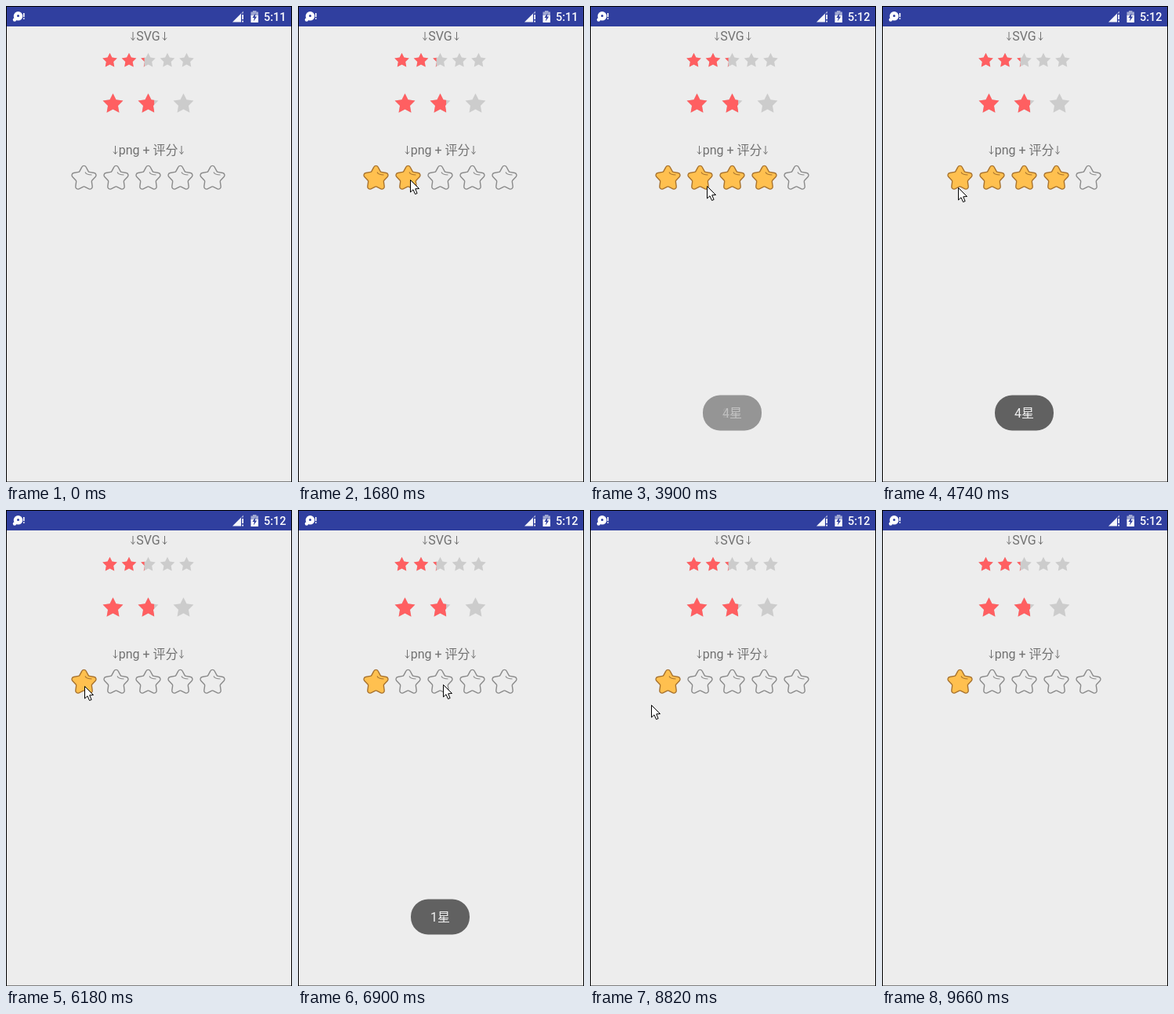
An HTML page with a canvas that plays this animation: 365x606 px, repeating every 9.96 s.

```html
<!DOCTYPE html>
<html lang="zh">
<head>
<meta charset="utf-8">
<title>Star rating</title>
<style>
  html, body { margin: 0; width: 100%; height: 100%; overflow: hidden; background: #ededed; }
  canvas { display: block; width: 365px; height: 606px; }
</style>
</head>
<body>
<canvas id="stage"></canvas>
<script>
const W = 365, H = 606, LOOP = 9960, STEP = 60;
const FONT = 'Roboto, "Noto Sans CJK SC", "Noto Sans CJK", sans-serif';
const RED = '#ff5f61', GREY = '#cccccc', INK = '#727272', BAR = '#303f9f';

const canvas = document.getElementById('stage');
const ctx = canvas.getContext('2d');
const dpr = window.devicePixelRatio || 1;
canvas.width = W * dpr;
canvas.height = H * dpr;

// Pointer path: time, x, y
const path = [
  [180, 289, 105], [540, 212, 172], [840, 139, 220], [1020, 143, 221],
  [1860, 143, 221], [2400, 227, 220],
  [3180, 227, 220], [3720, 175, 226], [4200, 108, 232], [4320, 101, 232],
  [4440, 101, 232], [4740, 97, 231], [4860, 97, 231], [5340, 100, 224],
  [6600, 100, 224], [7140, 271, 221], [7320, 296, 222],
  [7680, 296, 222], [7860, 304, 222], [8220, 236, 254], [8580, 74, 250],
  [8760, 74, 250], [9240, 220, 178], [9600, 355, 43]
];
const toasts = [
  { text: '2星', show: 1700, hide: 3620 },
  { text: '4星', show: 3760, hide: 5600 },
  { text: '1星', show: 6200, hide: 8100 }
];
const FADE_IN = 540, FADE_OUT = 340;

const clamp = v => Math.max(0, Math.min(1, v));

function slope(i, axis) {
  const a = path[i], b = path[i + 1];
  return (b[axis] - a[axis]) / (b[0] - a[0]);
}

// Flat at rests and turning points, so the curve never overshoots
function tangent(i, axis) {
  if (i === 0) return slope(0, axis);
  if (i === path.length - 1) return slope(i - 1, axis);
  const p = slope(i - 1, axis), n = slope(i, axis);
  return p * n <= 0 ? 0 : 2 * p * n / (p + n);
}

function along(t, axis) {
  let i = 0;
  while (i < path.length - 2 && t >= path[i + 1][0]) i++;
  const a = path[i], b = path[i + 1], d = b[0] - a[0];
  const u = clamp((t - a[0]) / d), v = 1 - u;
  return a[axis] * (1 + 2 * u) * v * v + tangent(i, axis) * d * u * v * v
       + b[axis] * u * u * (3 - 2 * u) - tangent(i + 1, axis) * d * u * u * v;
}

function rect(x, y, w, h, color) {
  ctx.fillStyle = color;
  ctx.fillRect(x, y, w, h);
}

function poly(points, color) {
  ctx.beginPath();
  points.forEach(([x, y]) => ctx.lineTo(x, y));
  ctx.closePath();
  ctx.fillStyle = color;
  ctx.fill();
}

function disc(x, y, r, color) {
  ctx.beginPath();
  ctx.arc(x, y, r, 0, Math.PI * 2);
  ctx.fillStyle = color;
  ctx.fill();
}

function label(text, x, y, size, color, weight = 400) {
  ctx.font = `${weight} ${size}px ${FONT}`;
  ctx.fillStyle = color;
  ctx.fillText(text, x, y);
}

function starPoints(cx, cy, outer, inner) {
  return Array.from({ length: 10 }, (_, i) => {
    const r = i % 2 ? inner : outer, a = i * Math.PI / 5 - Math.PI / 2;
    return [cx + r * Math.cos(a), cy + r * Math.sin(a)];
  });
}

function flatStar(cx, cy, r, fill) {
  const points = starPoints(cx, cy, r, r * 0.5);
  poly(points, GREY);
  if (!fill) return;
  ctx.save();
  ctx.beginPath();
  ctx.rect(cx - r, cy - r, 2 * r * fill, 2 * r);
  ctx.clip();
  poly(points, RED);
  ctx.restore();
}

function roundStar(cx, cy, on) {
  const p = starPoints(cx, cy, 19.5, 10.2);
  ctx.beginPath();
  ctx.moveTo((p[9][0] + p[0][0]) / 2, (p[9][1] + p[0][1]) / 2);
  p.forEach((q, i) => {
    const n = p[(i + 1) % 10];
    ctx.arcTo(q[0], q[1], n[0], n[1], i % 2 ? 2 : 3);
  });
  ctx.closePath();
  if (on) {
    ctx.fillStyle = '#ffc04f';
    ctx.fill();
  }
  ctx.strokeStyle = on ? '#a8732f' : '#8a8a8a';
  ctx.lineWidth = 1.4;
  ctx.stroke();
  ctx.beginPath();
  ctx.moveTo(cx + 1.5, cy - 8);
  ctx.quadraticCurveTo(cx + 3, cy - 4.5, cx + 10, cy - 4.5);
  ctx.lineWidth = 1.1;
  ctx.stroke();
}

function arrow(x, base) {
  ctx.beginPath();
  ctx.moveTo(x, base - 10.5);
  ctx.lineTo(x, base);
  ctx.moveTo(x - 2.5, base - 3);
  ctx.lineTo(x, base);
  ctx.lineTo(x + 2.5, base - 3);
  ctx.strokeStyle = INK;
  ctx.lineWidth = 1;
  ctx.stroke();
}

function statusBar(time) {
  rect(0, 1, W, 25, BAR);
  // Notification
  disc(15.5, 12.8, 5.8, '#fff');
  disc(15.5, 12.5, 1.5, BAR);
  disc(11, 17.5, 2.2, '#fff');
  rect(22, 9, 1.6, 5, '#fff');
  rect(22, 15.2, 1.6, 1.6, '#fff');
  // Signal
  poly([[289, 20.5], [300, 20.5], [300, 9.5]], '#f4f5fa');
  poly([[300, 9.5], [303, 6.5], [303, 9.5]], '#aab1d8');
  rect(301.3, 11, 1.7, 6, '#fff');
  rect(301.3, 18.6, 1.7, 1.9, '#fff');
  // Battery
  rect(315, 6, 4.5, 2, '#a0a8d2');
  rect(312.5, 7.5, 9.5, 5, '#a0a8d2');
  rect(312.5, 12, 9.5, 9, '#fff');
  poly([[318.6, 9], [314.4, 15], [316.8, 15], [316, 19.5], [320.2, 13.5], [317.8, 13.5]], BAR);
  label(time, 329, 19, 14.4, '#fff', 500);
}

function toast({ text, show, hide }, t) {
  if (t <= show || t >= hide + FADE_OUT) return;
  const enter = 1 - (1 - clamp((t - show) / FADE_IN)) ** 2;
  const exit = 1 - clamp((t - hide) / FADE_OUT) ** 2;
  ctx.save();
  ctx.globalAlpha = enter * exit;
  ctx.beginPath();
  ctx.roundRect(144, 495.5, 75, 45, 22);
  ctx.fillStyle = '#616161';
  ctx.fill();
  label(text, 169, 524, 16, '#f2f2f2');
  ctx.restore();
}

function pointer(t) {
  if (t < 180 || t >= 9660) return;
  ctx.save();
  ctx.translate(Math.round(along(t, 1)) + 0.5, Math.round(along(t, 2)) + 0.5);
  poly([[0, 0], [0, 15.5], [3.5, 12.3], [6, 18], [8.6, 17], [6.2, 11.3], [11, 11]], '#fff');
  ctx.strokeStyle = '#000';
  ctx.lineWidth = 1;
  ctx.stroke();
  ctx.restore();
}

function draw(t) {
  ctx.setTransform(dpr, 0, 0, dpr, 0, 0);
  rect(0, 0, W, H, '#ededed');
  statusBar(t < 2040 ? '5:11' : '5:12');

  label('SVG', 166.2, 43.5, 16, INK);
  arrow(162, 43.5);
  arrow(202.5, 43.5);
  for (let i = 0; i < 5; i++) flatStar(132.5 + 24.5 * i, 69.5, 9.8, clamp(2.25 - i));
  for (let i = 0; i < 3; i++) flatStar(136.5 + 45 * i, 124.8, 13.6, clamp(1.78 - i));

  label('png + 评分', 143.7, 188.5, 16, INK);
  arrow(139.5, 188.5);
  arrow(224, 188.5);
  const rating = t < 1680 ? 0 : t < 2640 ? 2 : t < 6180 ? 4 : 1;
  for (let i = 0; i < 5; i++) roundStar(99.5 + 41 * i, 219.5, i < rating);

  toasts.forEach(item => toast(item, t));
  pointer(t);

  rect(0, 605, W, 1, '#808080');
  rect(0, 0, W, 1, '#000');
  rect(0, 0, 1, H, '#000');
  rect(364, 0, 1, H, '#000');
}

const start = performance.now();
function tick() {
  const t = (performance.now() - start) % LOOP;
  draw(Math.floor(t / STEP) * STEP);
  requestAnimationFrame(tick);
}
tick();
</script>
</body>
</html>
```
